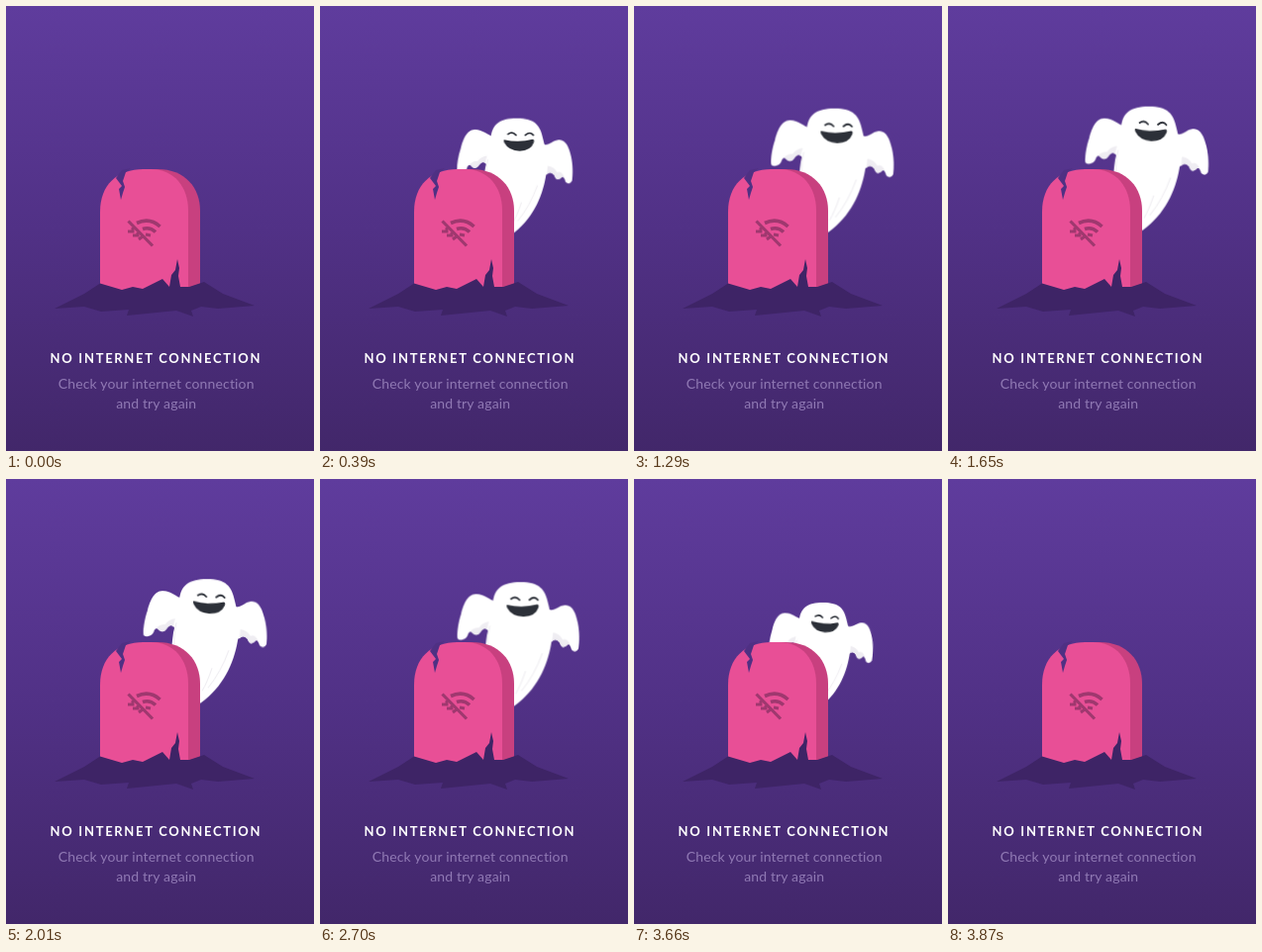
An HTML page for the animation above (4.53 s loop, 311 px wide and 450 px high).

```html
<!DOCTYPE html>
<html lang="en">
<head>
<meta charset="utf-8">
<title>No internet connection</title>
<style>
  html, body { margin: 0; width: 100%; height: 100%; overflow: hidden; background: #4b2d7d; }
  svg { display: block; width: 311px; height: 450px; }
  text { font-family: Lato, "Open Sans", sans-serif; text-anchor: middle; }
  .title { font-size: 13px; font-weight: 700; letter-spacing: 1.7px; fill: #fff; }
  .hint { font-size: 14px; letter-spacing: .15px; fill: #9079b4; }

  .pop, .float, .face, .arm { animation: 4530ms linear infinite; }
  .pop { animation-name: pop; transform-origin: 145px 235px; }
  .float { animation-name: float; }
  .face { animation-name: nod; transform-origin: 204px 130px; }
  .arm { animation-name: wave; }
  .left { transform-origin: 172px 130px; }
  .right { transform-origin: 232px 140px; animation-name: waveRight; }

  /* Grows out from behind the stone, then slips back */
  @keyframes pop {
    0%, 1.3% { transform: scale(0); animation-timing-function: cubic-bezier(.15, .75, .35, 1); }
    14.1%, 74.6% { transform: none; animation-timing-function: cubic-bezier(.6, 0, .8, .45); }
    87.4%, 100% { transform: translate(-22px, 0) scale(0); }
  }
  @keyframes float {
    0%, 14.1% { transform: translate(0, .3px); animation-timing-function: ease-in-out; }
    42% { transform: translate(.8px, -4.8px); }
    45.2% { transform: translate(1px, -4.8px); animation-timing-function: ease-in-out; }
    73%, 100% { transform: translate(0, 1px); }
  }
  @keyframes nod {
    0%, 20% { transform: rotate(0deg); animation-timing-function: ease-in-out; }
    44% { transform: rotate(3deg); animation-timing-function: ease-in-out; }
    59% { transform: rotate(0deg); animation-timing-function: ease-in-out; }
    73%, 100% { transform: rotate(4deg); }
  }
  @keyframes wave {
    0%, 20% { transform: rotate(0deg); animation-timing-function: ease-in-out; }
    44% { transform: rotate(.5deg); animation-timing-function: ease-in-out; }
    73%, 100% { transform: rotate(-1deg); }
  }
  @keyframes waveRight {
    0%, 20% { transform: rotate(0deg); animation-timing-function: ease-in-out; }
    44% { transform: rotate(-2deg); animation-timing-function: ease-in-out; }
    73%, 100% { transform: rotate(3deg); }
  }
</style>
</head>
<body>
<svg viewBox="0 0 311 450">
  <defs>
    <linearGradient id="sky" x2="0" y2="1">
      <stop stop-color="#5f3c9d"/>
      <stop offset=".5" stop-color="#513186"/>
      <stop offset="1" stop-color="#42276a"/>
    </linearGradient>
  </defs>
  <rect width="311" height="450" fill="url(#sky)"/>

  <g class="pop"><g class="float">
    <g class="arm left">
      <path fill="#fff" d="M178 126C170 124 166 118 157 118C148 118 144 130 142 138C139 147 138 155 138 161Q138 165 143 164Q148 163 149 158Q151 154 154 158Q158 161 161 157Q165 151 168 154L178 162Z"/>
      <path fill="#efedf2" d="M149 158Q151 154 154 158Q158 161 161 157Q165 151 168 154L170 146Q163 147 160 152Q154 151 149 158Z"/>
    </g>
    <g class="arm right">
      <path fill="#fff" d="M226 132C236 138 238 130 247 129C255 129 258 138 260 147C262 156 262 166 261 173Q258 178 254 174Q252 166 249 170Q244 174 242 167Q238 162 234 166L222 170Z"/>
      <path fill="#efedf2" d="M254 174Q252 166 249 170Q244 174 242 167Q238 162 234 166L235 157Q242 158 245 164Q251 161 254 174Z"/>
    </g>
    <path fill="#fff" d="M174 128C175 112 184 106 202 106C221 106 227 113 230 128C233 140 236 152 233 168C229 192 218 215 196 231L180 240C165 220 164 186 168 160C171 147 173 139 174 128Z"/>
    <path fill="none" stroke="#eeecf1" d="M171 150Q167 168 170 184M224 178Q216 200 203 216M207 196Q202 211 197 219"/>
    <g class="face">
      <path fill="none" stroke="#2c3038" stroke-width="1.8" stroke-linecap="round" d="M192.500 123Q197 119.500 201 124M211 124Q216 119.500 219.500 124"/>
      <path fill="#2c3038" d="M188.500 129Q204 132.500 219 128.500Q221 129 220 132Q217 140.500 205 141Q193 140.500 188.500 132Q187.500 129 188.500 129Z"/>
    </g>
  </g></g>

  <path fill="#c8407f" d="M137 165H153C181 165 196 184 196 207V288H150Z"/>
  <path fill="#e84f96" d="M95 290V208C95 181 112 165 139 165H146C170 165 184 183 184 207V290Z"/>
  <path fill="#4f3083" d="M126 164L121 168L118 177L120 183L118 189L116 196L114 185L117 182L111 174L117 166Z"/>

  <path fill="#3e2466" d="M49 306L79 291L95 280.500L117 287L128 284L138 286L158 276L165 284L167 272L171 267L173 256L175 265L174 273L176 284L185 284L200 279L219 291L251 303L214 306L197 304L187 308L189 314L172 308L122 313L124 307L96 309L79 304Z"/>

  <g fill="none" stroke="#9f386f" stroke-width="3.600">
    <path d="M132 219.500Q145 213.500 155.500 223"/>
    <path d="M138 225.500Q145 223 151 228.500"/>
    <path d="M123.500 217.500L148 242.500" stroke-width="3.200"/>
    <path d="M123 228H128V224M128 232H133V229M134 236L138 233M141 231L146 232" stroke-width="3"/>
  </g>

  <text class="title" x="151.400" y="361">NO INTERNET CONNECTION</text>
  <text class="hint" x="151.700" y="387">Check your internet connection</text>
  <text class="hint" x="151.700" y="407">and try again</text>
</svg>
</body>
</html>
```
